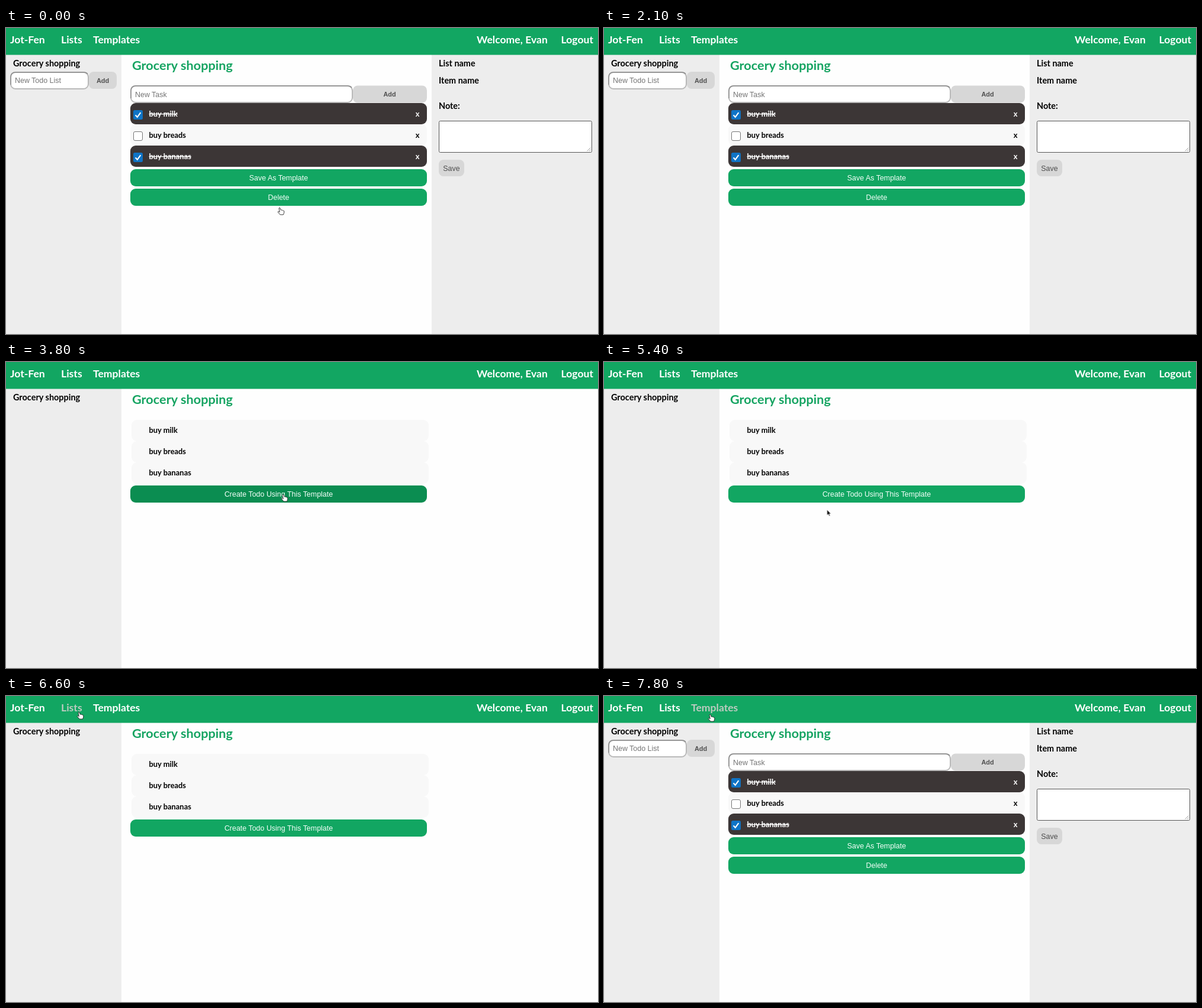
Write an HTML page that moves like this. It is 1000x518 px and loops after 8000 ms.

```html
<!DOCTYPE html>
<html lang="en">
<head>
<meta charset="utf-8">
<title>Todo templates</title>
<style>
html, body { margin: 0; width: 100%; height: 100%; overflow: hidden; background: #fefefe; }
svg { display: block; width: 100vw; height: 100vh; }

text { font: bold 14.45px Lato, Carlito, sans-serif; }
.nav { font-size: 17.6px; fill: #fff; }
.title { font-size: 21.7px; fill: #16a462; }
.task { font-size: 12.9px; }
.done { fill: #fff; text-decoration: line-through; }
.x { font-size: 12.9px; text-anchor: middle; }
.white { fill: #fff; }
.ui { font: 12.45px "Liberation Sans", Arial, sans-serif; fill: #757575; }
.mid { text-anchor: middle; }
.add { font-weight: bold; font-size: 10.9px; fill: #4f4f4f; }
.onGreen { fill: #f4fff9; }
.save { fill: #4d4d4d; }

.side { fill: #ededed; }
.green { fill: #12a662; }
.grey { fill: #d7d7d7; }
.dark { fill: #3c3636; }
.pale { fill: #f8f8f8; }
.field { fill: #fff; stroke: #b9b9b9; stroke-width: 2; }
.bevel { fill: none; stroke: #8b8b8b; stroke-width: 1.4; }

/* everything shares one 8 s clock: 100 ms = 1.25% */
.anim, .hover { animation: 8s step-end infinite; }
#lists { animation-name: lists; }
#templates { animation-name: templates; }
#hand { animation-name: hand; }
#arrow { animation-name: arrow; }
#del { animation-name: del; }
#saveAs { animation-name: saveAs; }
#create { animation-name: create; }
#navLists { animation-name: navLists; }
#navTemplates { animation-name: navTemplates; }
#pointer { animation: move 8s linear infinite; }

@keyframes lists { 0%, 86.25% { opacity: 1 } 32.5% { opacity: 0 } 100% { opacity: 1 } }
@keyframes templates { 0%, 86.25% { opacity: 0 } 32.5% { opacity: 1 } 100% { opacity: 0 } }

@keyframes hand {
  0%, 46.25%, 82.5%, 93.75%, 100% { opacity: 1 }
  26.25%, 52.5%, 90% { opacity: 0 }
}
@keyframes arrow {
  0%, 46.25%, 82.5%, 93.75%, 100% { opacity: 0 }
  42.5%, 52.5%, 90% { opacity: 1 }
}

@keyframes del { 0%, 3.75%, 100% { fill: #12a662 } 1.25% { fill: #0b8d51 } }
@keyframes saveAs { 0%, 26.25%, 100% { fill: #12a662 } 3.75% { fill: #0b8d51 } }
@keyframes create { 0%, 52.5%, 100% { fill: #12a662 } 46.25% { fill: #0b8d51 } }
@keyframes navLists { 0%, 86.25%, 100% { fill: #fff } 82.5% { fill: #bccbc0 } }
@keyframes navTemplates { 0% { fill: #fff } 93.75%, 100% { fill: #bccbc0 } }

@keyframes move {
  0% { transform: translate(462px, 304px) }
  1.25% { transform: translate(462px, 304px); animation-timing-function: steps(4, start) }
  6.25%, 42.4% { transform: translate(475px, 252px); animation-timing-function: step-end }
  42.5% { transform: translate(560px, 140px); animation-timing-function: steps(2, start) }
  45% { transform: translate(505px, 190px) }
  46.25% { transform: translate(505px, 190px); animation-timing-function: steps(2, start) }
  48.75% { transform: translate(468px, 224px) }
  51.25% { transform: translate(468px, 224px); animation-timing-function: steps(5, start) }
  57.5% { transform: translate(420px, 280px) }
  67.5% { transform: translate(420px, 280px); animation-timing-function: steps(3, start) }
  71.25% { transform: translate(290px, 190px) }
  72.5% { transform: translate(290px, 190px); animation-timing-function: steps(3, start) }
  76.25% { transform: translate(173px, 103px) }
  77.5% { transform: translate(173px, 103px); animation-timing-function: steps(5, start) }
  83.75% { transform: translate(123px, 27px) }
  90% { transform: translate(123px, 27px); animation-timing-function: steps(7, start) }
  98.75%, 100% { transform: translate(179px, 31px) }
}
</style>
</head>
<body>
<svg viewBox="0 0 1000 518" preserveAspectRatio="none">
  <defs>
    <g id="checked">
      <rect width="16" height="16" rx="2.5" fill="#0f74c6"/>
      <path d="M3.6 8.4 6.8 11.8 12.4 4.2" fill="none" stroke="#fff" stroke-width="2.1"/>
    </g>
  </defs>

  <rect width="1000" height="518" fill="#fefefe"/>
  <rect class="side" y="45" width="195" height="473"/>
  <text x="12" y="65">Grocery shopping</text>
  <text class="title" x="213" y="71">Grocery shopping</text>

  <g id="lists" class="anim">
    <rect class="side" x="719" y="45" width="281" height="473"/>

    <rect class="field" x="8" y="75" width="131" height="28" rx="8"/>
    <path class="bevel" d="M8 96V83q0-8 8-8h115q5 0 7 3"/>
    <text class="ui" x="15" y="93">New Todo List</text>
    <rect class="grey" x="140" y="74" width="47" height="29" rx="8"/>
    <text class="ui mid add" x="163.5" y="92.5">Add</text>

    <rect class="field" x="211" y="98" width="374" height="28" rx="8"/>
    <path class="bevel" d="M211 119V106q0-8 8-8h358q5 0 7 3"/>
    <text class="ui" x="218" y="116.5">New Task</text>
    <rect class="grey" x="586" y="97.500" width="125" height="29" rx="8"/>
    <text class="ui mid add" x="648" y="116">Add</text>

    <rect class="dark" x="210" y="127" width="501" height="36" rx="9"/>
    <rect class="pale" x="210" y="163" width="501" height="36" rx="9"/>
    <rect class="dark" x="210" y="199" width="501" height="36" rx="9"/>
    <use href="#checked" x="215" y="139"/>
    <rect x="215.500" y="175.500" width="15" height="15" rx="2.500" fill="#fff" stroke="#767676"/>
    <use href="#checked" x="215" y="211"/>
    <text class="task done" x="241.5" y="150">buy milk</text>
    <text class="task" x="241.5" y="186">buy breads</text>
    <text class="task done" x="241.5" y="222">buy bananas</text>
    <text class="x white" x="695" y="150">x</text>
    <text class="x" x="695" y="186">x</text>
    <text class="x white" x="695" y="222">x</text>

    <rect id="saveAs" class="green hover" x="210" y="239" width="501" height="29" rx="9"/>
    <text class="ui mid onGreen" x="460.5" y="257.5">Save As Template</text>
    <rect id="del" class="green hover" x="210" y="272" width="501" height="29" rx="9"/>
    <text class="ui mid onGreen" x="460.5" y="290.5">Delete</text>

    <text x="731" y="65">List name</text>
    <text x="731" y="93.5">Item name</text>
    <text x="731" y="137">Note:</text>
    <rect x="731.5" y="157.5" width="258" height="53" rx="2" fill="#fff" stroke="#555"/>
    <path d="M981.500 208.500l6-6M985 208.500l2.500-2.500" stroke="#888" stroke-width=".8"/>
    <rect class="grey" x="731" y="223" width="43" height="28" rx="8"/>
    <text class="ui mid save" x="752.5" y="241.5">Save</text>
  </g>

  <g id="templates" class="anim" opacity="0">
    <rect class="pale" x="212" y="98" width="502" height="36" rx="9"/>
    <rect class="pale" x="212" y="134" width="502" height="36" rx="9"/>
    <rect class="pale" x="212" y="170" width="502" height="36" rx="9"/>
    <text class="task" x="241.5" y="120">buy milk</text>
    <text class="task" x="241.5" y="156">buy breads</text>
    <text class="task" x="241.5" y="192">buy bananas</text>
    <rect id="create" class="green hover" x="210" y="209" width="501" height="29" rx="9"/>
    <text class="ui mid onGreen" x="460.5" y="227.5">Create Todo Using This Template</text>
  </g>

  <rect class="green" width="1000" height="45.5"/>
  <text class="nav" x="7" y="26">Jot-Fen</text>
  <text id="navLists" class="nav hover" x="93" y="26">Lists</text>
  <text id="navTemplates" class="nav hover" x="147" y="26">Templates</text>
  <text class="nav" x="795" y="26">Welcome, Evan</text>
  <text class="nav" x="992" y="26" text-anchor="end">Logout</text>

  <g id="pointer">
    <path id="hand" class="anim" fill="#fff" stroke="#222" stroke-width=".9" stroke-linejoin="round"
      d="M-1 1Q0-.8 1.200 1L2.200 4.200Q3.500 3.400 4.300 4.600 5.600 4 6.200 5.200 7.800 5 7.900 6.800L7.500 9.500 6.500 12H1.200L-2.600 7.800Q-2.800 6.200-1.200 6.600L.3 7.600Z"/>
    <path id="arrow" class="anim" opacity="0" fill="#111" stroke="#fff" stroke-width=".7"
      d="M0 0V9.500L2.200 7.600 3.700 11 5.300 10.300 3.800 7H6.600Z"/>
  </g>
</svg>
</body>
</html>
```
